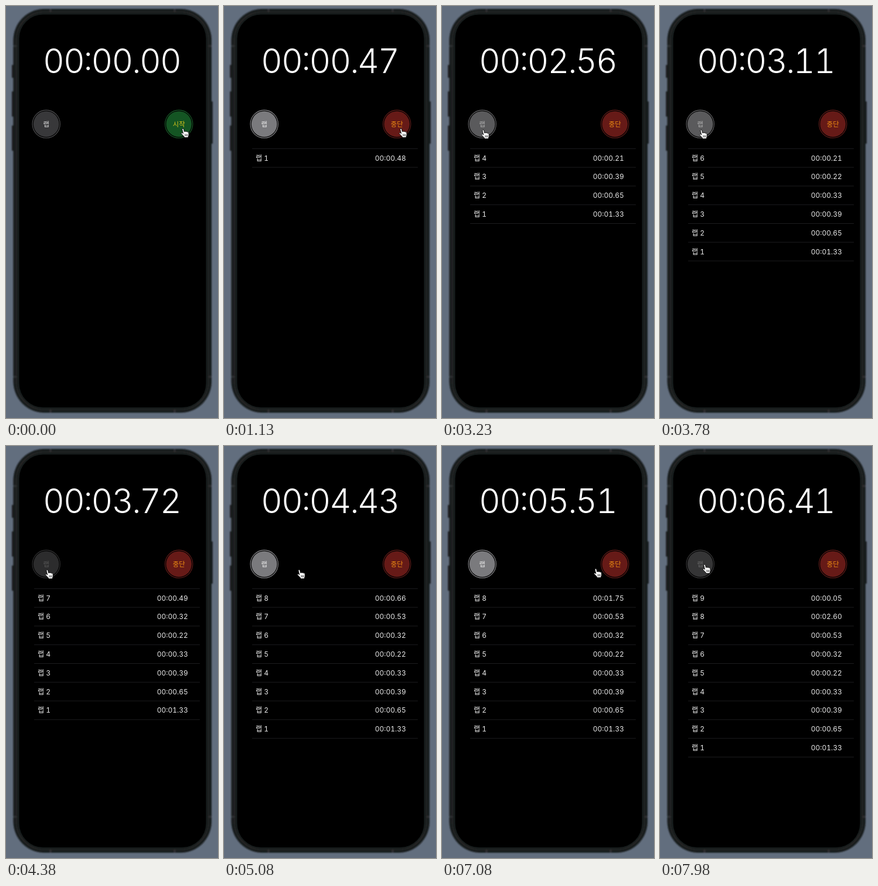
Recreate the animation shown at these times as an HTML page. Size 362 by 700 pixels, loop 8 s.

```html
<!DOCTYPE html>
<html lang="ko">
<head>
<meta charset="utf-8">
<title>Stopwatch</title>
<style>
  html, body { margin: 0; width: 100%; height: 100%; overflow: hidden; background: #626e7e; }
  svg { display: block; width: 362px; height: 700px; }
  text { font-family: Inter, "Noto Sans CJK KR", "Noto Sans CJK", sans-serif; font-variant-numeric: tabular-nums; }
  #clock { font-size: 57px; font-weight: 300; fill: #fff; text-anchor: middle; font-feature-settings: "calt" 0, "tnum" 1; }
  .btn text { font-size: 11.3px; text-anchor: middle; }
  .row text { font-size: 12px; fill: #e9e9e9; }
  .row .time { text-anchor: middle; }
  .line { stroke: #1c1c1e; stroke-width: 1; }
</style>
</head>
<body>
<svg viewBox="0 0 362 700">
  <defs>
    <filter id="soft" x="-5%" y="-5%" width="110%" height="110%"><feGaussianBlur stdDeviation="0.9"/></filter>
  </defs>
  <rect width="362" height="700" fill="#626e7e"/>
  <g filter="url(#soft)">
    <g fill="#1d1f21">
      <rect x="10" y="100" width="5" height="22" rx="1"/>
      <rect x="10" y="145" width="5" height="43" rx="1"/>
      <rect x="10" y="203" width="5" height="43" rx="1"/>
      <rect x="348" y="162" width="5" height="72" rx="1"/>
    </g>
    <rect x="12.5" y="5" width="338.5" height="686" rx="53" fill="#191a1b"/>
    <rect x="17.5" y="10" width="328.5" height="676" rx="48" fill="none" stroke="#222" stroke-width="3"/>
    <path d="M76 5v5M288 5v5M76 686v5M288 686v5M13 68h5M346 68h5M13 630h5M346 630h5" stroke="#303234" stroke-width="2.5"/>
  </g>
  <rect x="22.5" y="14.5" width="319" height="667.5" rx="41"/>
  <text id="clock" y="113.7" x="81.5 116.5 140.2 164 199 222.8 246.5 281.5" dy="0 0 -5.2 5.2">00:00.00</text>
  <g id="rows"></g>
  <g id="left" class="btn" transform="translate(68.7 200.6)"></g>
  <g id="right" class="btn" transform="translate(295.2 200.6)"></g>
  <g id="hand" stroke="#000" stroke-width="0.9" stroke-linejoin="round" stroke-linecap="round">
    <path fill="#fff" d="M-1.7 1.4C-2-.5.6-.9 1 .9L2 5.2C2.6 4 4.2 4 4.6 5.3 5.2 4.2 6.8 4.4 7.1 5.8 7.8 4.9 9.3 5.3 9.4 6.9L9.6 10.4C9.5 12 8.7 13 8.5 14.8L2.4 15C1.8 13-.8 11-2.6 9-4 7.6-2.7 6.2-1.2 7.2L-.2 8Z"/>
    <path fill="none" stroke-width="0.7" d="M3.2 9.3l.2 3M5.2 9.3l.1 3M7.2 9.3l-.1 3"/>
  </g>
</svg>
<script>
const LOOP = 8000, START = 660, STOP = 5740, RESTART = 6650;
const laps = [1330, 1980, 2370, 2700, 2920, 3240, 3770, 6370]; // clock value at each lap
const lapTaps = [1990, 2640, 3030, 3360, 3580, 3900, 4430, 7940].map(up => [up - 100, up]);
const mainTaps = [[130, START], [STOP - 100, STOP], [RESTART - 120, RESTART - 20]];

// pointer moves: begin, end, x, y
const home = [302.5, 208.5];
const moves = [
  [1200, 1830, 67, 205],
  [2330, 2600, 70.7, 210.7],
  [4870, 5500, 294.5, 210],
  [6900, 7650, 76.5, 201.5]
];

const looks = {
  off: { fill: '#38383a', ring: '#515153', ink: '#dedede' },
  on: { fill: '#7a7a7d', ring: '#8a8a8d', ink: '#ececec' },
  go: { fill: '#145523', ring: '#1a5c2a', ink: '#d6c31c' },
  halt: { fill: '#661a17', ring: '#641d1a', ink: '#f08f12' }
};

const $ = id => document.getElementById(id);
const clamp = (v, lo, hi) => Math.min(hi, Math.max(lo, v));
const ease = u => u * u * (3 - 2 * u);

function add(parent, tag, attrs) {
  const el = document.createElementNS('http://www.w3.org/2000/svg', tag);
  for (const key in attrs) el.setAttribute(key, attrs[key]);
  return parent.appendChild(el);
}

function makeButton(group) {
  const ring = add(group, 'circle', { r: 23.7, fill: 'none', 'stroke-width': 1.1 });
  const disc = add(group, 'circle', { r: 21.9 });
  const label = add(group, 'text', { y: 4.1 });
  return (text, look, alpha) => {
    ring.setAttribute('stroke', look.ring);
    disc.setAttribute('fill', look.fill);
    label.setAttribute('fill', look.ink);
    label.textContent = text;
    group.setAttribute('opacity', alpha);
  };
}

const PITCH = 31.8;
const line = (parent, y) => add(parent, 'path', { class: 'line', d: `M48 ${y}H331` });
const topLine = line($('rows'), 242.3);
const rows = Array.from({ length: 9 }, (_, i) => {
  const g = add($('rows'), 'g', { class: 'row' });
  const y = 262.6 + i * PITCH;
  line(g, 242.3 + (i + 1) * PITCH);
  return {
    g,
    name: add(g, 'text', { x: 54, y }),
    time: add(g, 'text', { class: 'time', x: 284.3, y })
  };
});
const setLeft = makeButton($('left'));
const setRight = makeButton($('right'));

function format(ms) {
  const cs = Math.round(ms / 10);
  const two = n => String(n).padStart(2, '0');
  return `${two(Math.floor(cs / 6000))}:${two(Math.floor(cs / 100) % 60)}.${two(cs % 100)}`;
}

// dimmed while held, then fades back
function pressAlpha(taps, t) {
  const tap = taps.filter(([down]) => t >= down).pop();
  if (!tap) return 1;
  return 0.36 + 0.64 * clamp((t - tap[1]) / 335, 0, 1);
}

function pointer(t) {
  let [x, y] = home;
  for (const [begin, end, tx, ty] of moves) {
    const u = ease(clamp((t - begin) / (end - begin), 0, 1));
    x += (tx - x) * u;
    y += (ty - y) * u;
  }
  return `translate(${x.toFixed(2)} ${y.toFixed(2)})`;
}

function draw(time) {
  const t = Math.max(0, Math.floor((time - 30) / 50) * 50 + 30); // screen refreshes every 50 ms
  const elapsed = clamp(t - START, 0, STOP - START) + Math.max(0, t - RESTART);
  const started = t >= START;
  const paused = t >= STOP && t < RESTART - 20;

  const lag = started && t < STOP ? 12 * Math.sin(2 * Math.PI * (t - 1130) / 3250) : 0;
  $('clock').textContent = format(Math.max(0, elapsed + lag));

  const lapClock = elapsed + 10;
  const done = laps.filter(v => lapClock >= v).length;
  const count = started ? done + 1 : 0;
  topLine.style.display = started ? '' : 'none';
  rows.forEach((row, i) => {
    row.g.style.display = i < count ? '' : 'none';
    if (i >= count) return;
    const n = count - 1 - i;
    const end = n < done ? laps[n] : lapClock;
    row.name.textContent = `랩 ${n + 1}`;
    row.time.textContent = format(end - (n ? laps[n - 1] : 0));
  });

  setLeft(paused ? '재설정' : '랩', started ? looks.on : looks.off, pressAlpha(lapTaps, t));
  const running = started && !paused;
  setRight(running ? '중단' : '시작', running ? looks.halt : looks.go, pressAlpha(mainTaps, t));
  $('hand').setAttribute('transform', pointer(t));
}

const origin = performance.now();
function tick() {
  draw((performance.now() - origin) % LOOP);
  requestAnimationFrame(tick);
}
tick();
</script>
</body>
</html>
```
